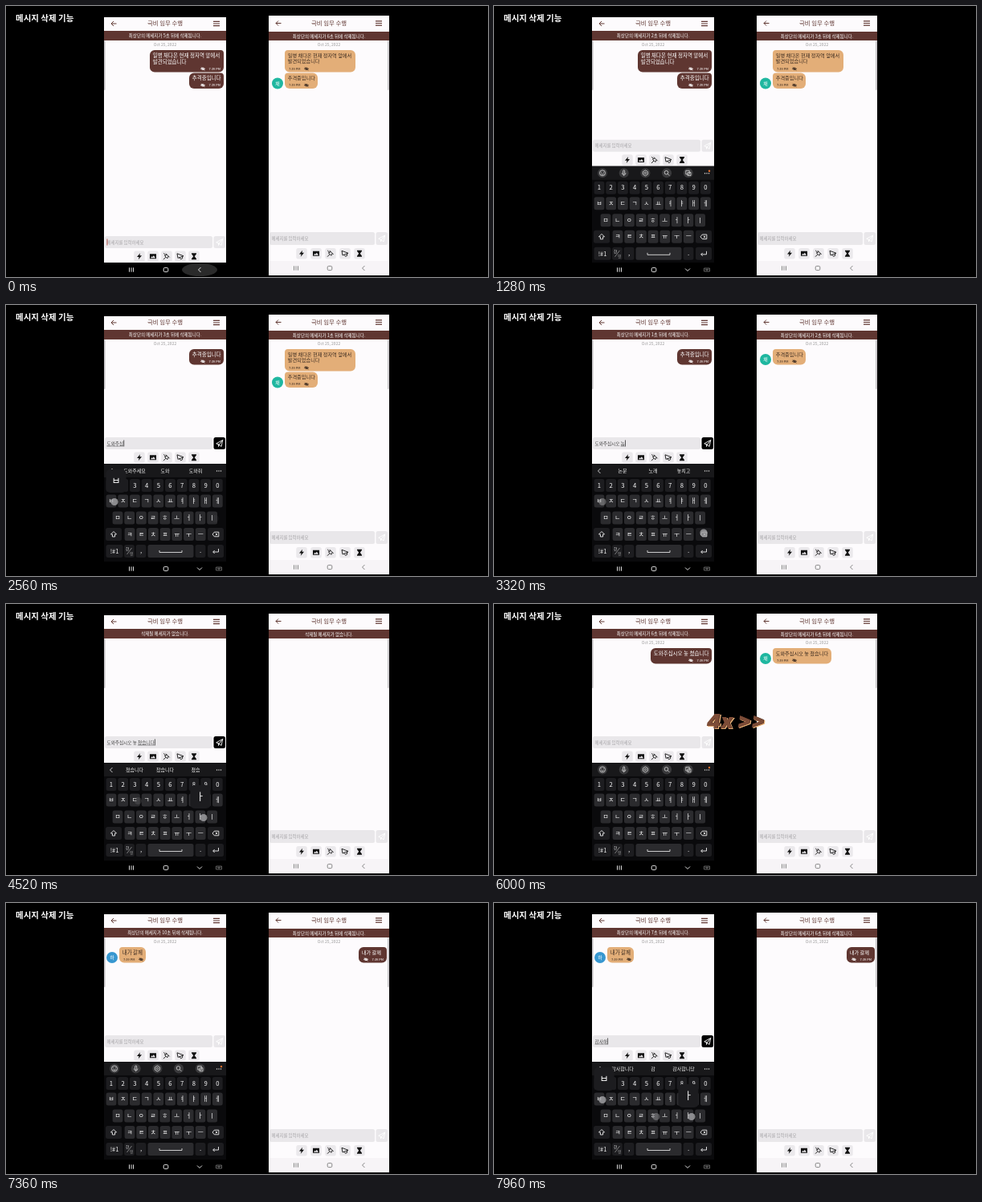
An HTML page with a canvas for the animation above (8000 ms loop, 600x338 px).

```html
<!DOCTYPE html>
<html lang="ko">
<head>
<meta charset="utf-8">
<title>메시지 삭제 기능</title>
<style>
html, body { margin: 0; width: 100%; height: 100%; overflow: hidden; background: #000; }
canvas { display: block; width: 600px; height: 338px; }
</style>
</head>
<body>
<canvas></canvas>
<script>
const LOOP = 8000;
const canvas = document.querySelector('canvas');
const g = canvas.getContext('2d');
const dpr = window.devicePixelRatio || 1;
canvas.width = 600 * dpr;
canvas.height = 338 * dpr;

const FONT = '"Noto Sans CJK KR", "Noto Sans", sans-serif';
const BROWN = '#5f3631', TAN = '#e3ae78';

function box(x, y, w, h, r, color) {
  g.fillStyle = color;
  g.beginPath();
  g.roundRect(x, y, w, h, r);
  g.fill();
}
const centered = (x, y, w, h, r, color) => box(x - w / 2, y - h / 2, w, h, r, color);

function disc(x, y, r, color, ry = r) {
  g.fillStyle = color;
  g.beginPath();
  g.ellipse(x, y, r, ry, 0, 0, 7);
  g.fill();
}
function text(s, x, y, size, color, align = 'center', weight = 400) {
  g.font = `${weight} ${size}px ${FONT}`;
  g.textAlign = align;
  g.textBaseline = 'middle';
  g.fillStyle = color;
  g.fillText(s, x, y);
}
// Draws an icon around (x, y): stroked when a line width is given, else filled.
function icon(d, x, y, color, width) {
  g.save();
  g.translate(x, y);
  g.fillStyle = g.strokeStyle = color;
  g.lineWidth = width;
  if (width) g.stroke(new Path2D(d)); else g.fill(new Path2D(d));
  g.restore();
}
const clamp = v => Math.max(0, Math.min(1, v));
const ease = v => 1 - (1 - clamp(v)) ** 3;

const ICON = {
  back: 'M3.5 0H-3M0-3L-3 0L0 3',
  menu: 'M-4-2.6H4M-4 0H4M-4 2.6H4',
  plane: 'M-4 .3L4-4L2.4 4L-.4 1.8ZM4-4L-.4 1.8L-1.2 4V1.1',
  eye: 'M-2.6 0Q0-2.8 2.6 0Q0 2.8-2.6 0M-2.2-1.8L2.4 2M.8 0A.8.8 0 1 1-.8 0A.8.8 0 1 1 .8 0',
  recent: 'M-2.5-2.7V2.7M0-2.7V2.7M2.5-2.7V2.7',
  home: 'M-1.3-2.6H1.3Q2.8-2.6 2.8-1.1V1.1Q2.8 2.6 1.3 2.6H-1.3Q-2.8 2.6-2.8 1.1V-1.1Q-2.8-2.6-1.3-2.6Z',
  left: 'M1.5-3L-1.5 0L1.5 3',
  down: 'M-3-1.5L0 1.5L3-1.5',
  board: 'M-3.5-2H3.5V2H-3.5ZM-2.2-.6H2.4M-1.5 .8H1.5',
  shift: 'M0-3.5L3.5 0H1.6V3H-1.6V0H-3.5Z',
  erase: 'M-4 0L-1.7-2.8H3.8V2.8H-1.7ZM-.3-1.2L2.1 1.2M2.1-1.2L-.3 1.2',
  enter: 'M3.5-3V1H-3.3M-1.3-1L-3.3 1L-1.3 3',
  space: 'M-5-1.2V1.2H5V-1.2'
};
const TOOLS = [
  ['M1-4L-3 .8H-.4L-1.2 4L3-1H.4Z'],
  ['M-4-3H4V3H-4ZM-3 2H3L.8-1L-.8 1L-1.6 0Z'],
  ['M-1.2-3.6L3.6 1.2M.2-2.2L-2.6-.8L.8 2.6L2.2-.2M-1 1L-4 4M-3.8-3.8L-1-1', .9],
  ['M-4-3.4L4-.4L-3 2.2ZM-1 1.6L.6 3.6L2.6 2.6V.2', .9],
  ['M-3-4H3V-3L.8 0L3 3V4H-3V3L-.8 0L-3-3Z']
];
const BAR = [
  'M3.5 0A3.5 3.5 0 1 1-3.5 0A3.5 3.5 0 1 1 3.5 0M-1.4-1.3V-.5M1.4-1.3V-.5M-1.7 1Q0 2.7 1.7 1',
  'M-1-2.5A1 1 0 0 1 1-2.5V0A1 1 0 0 1-1 0ZM-2.3 0A2.3 2.3 0 0 0 2.3 0M0 2.3V3.6',
  'M0-3.5L3-1.7V1.7L0 3.5L-3 1.7V-1.7ZM1.2 0A1.2 1.2 0 1 1-1.2 0A1.2 1.2 0 1 1 1.2 0',
  'M1.7-.6A2.3 2.3 0 1 1-2.9-.6A2.3 2.3 0 1 1 1.7-.6M1.1 1.1L3.3 3.3',
  'M-3-3H1.5V1.5H-3ZM-.8-.8H3.2V3.2H-.8Z'
];

const phones = {
  L: { x: 122, y: 14, w: 152, titleY: 22, bannerY: 31, fieldY: 287, fieldH: 15, fieldW: 134, gap: 17, toolX: 44,
       bottom: 320, lift: 122, size: 6.5, bar: '#000', ink: '#ddd', nav: [156, 199, 241, 265], navY: 329 },
  R: { x: 327, y: 12, w: 150, titleY: 21.5, bannerY: 32, fieldY: 282, fieldH: 16, fieldW: 131, gap: 18, toolX: 41,
       bottom: 318, lift: 121.5, size: 6.2, bar: '#f7f4f7', ink: '#888', nav: [361, 403, 445, 468], navY: 327 }
};

// Each message counts down on both phones; the receiver runs slightly late.
const LAG = .65;
const messages = [
  { by: 'L', from: -1e4, end: 2250, rate: 500, lines: ['일병 채다온 현재 정자역 앞에서', '발견되었습니다'], w: 92, wOther: 88 },
  { by: 'L', from: -1e4, end: 3700, rate: 500, lines: ['추격중입니다'], w: 43, wOther: 41, face: '채' },
  { by: 'L', from: 5000, end: 6975, rate: 184, lines: ['도와주십시오 놓 쳤습니다'], w: 76, wOther: 73, face: '채' },
  { by: 'R', from: 7160, end: 9000, rate: 184, lines: ['내가 갈께'], w: 35, wOther: 33, face: '하' }
];

const HELP = '도와주십시오 ';
const words = (prefix, list) => list.split('/').map(s => prefix + s);
const typing = [
  { side: 'L', until: 5000,
    keys: 'ㄷㅗㅇㅗㅏㅈㅜㅅㅣㅂㅅㅣㅇㅗ ㄴㅗㅂ⌫ㅎ ㅊㅕㅆㅅㅡㅂㄴㅣㄷㅏ',
    at: i => i < 19 ? 1960 + (i - 3) * 89.3 : 3300 + (i - 18) * 98,
    states: [
      ...words('', 'ㄷ/도/동/도오/도와/도왖/도와주/도와줏/도와주시/도와주십/도와주싮/도와주십시/도와주십싱/도와주십시오'),
      ...words(HELP, '/ㄴ/노/놉/노/놓'),
      ...words(HELP + '놓 ', '/ㅊ/쳐/쳤/쳤ㅅ/쳤스/쳤습/쳤습ㄴ/쳤습니/쳤습닏/쳤습니다')] },
  { side: 'R', until: 7160, keys: 'ㄴㅏㅣㄱㅏ ㄱㅏㄴㄱㅓ', at: i => 6700 + i * 40,
    states: words('', 'ㄴ/나/내/낵/내가/내가 /내가 ㄱ/내가 가/내가 갈/내가 갈ㄲ/내가 갈께') },
  { side: 'L', until: 9000, keys: 'ㄱㅏㅁㅅㅏㅎㅏㅂ', at: i => 7945 - (7 - i) * 50,
    states: words('', 'ㄱ/가/감/감ㅅ/감사/감샇/감사하/감사합') }
];
const hints = [
  [2100, 3000, '도와주세요/도와/도와줘'],
  [3000, 3600, '논문/노래/놓치고'],
  [3600, 5000, '쳤습니다/찼습니다/쳤습'],
  [7700, 8000, '감사합니다/감/감사합니당']
];
const taps = [[1060, 190, 294], [5000, 265, 173], [6420, 395, 289], [7160, 468, 168]];

const darkKeys = { ' ': [205, 307, 57], '⌫': [261, 286, 20] };
[['1234567890', 131, 225], ['ㅂㅈㄷㄱㅅㅛㅕㅑㅐㅔ', 131, 244.5], ['ㅁㄴㅇㄹㅎㅗㅓㅏㅣ', 139, 265.5], ['ㅋㅌㅊㅍㅠㅜㅡ', 154, 286]]
  .forEach(([row, x, y]) => [...row].forEach((c, i) => darkKeys[c] = [x + i * 14.7, y, 12.8]));
const lightKeys = { ' ': [457, 253, 32] };
const lightRows = ['ㄱㅋ', 'ㅣㅡ', 'ㅏㅑ', 'ㄷㅌ', 'ㄴㄹ', 'ㅓㅕ', 'ㅁㅅ', 'ㅂㅍ', 'ㅗㅛ', 'ㅈㅊ', 'ㅇㅎ', 'ㅜㅠ'];
lightRows.forEach((s, i) => lightKeys[s[0]] = [348 + i % 3 * 36.5, 228 + (i / 3 | 0) * 24.7, 34]);

function darkBoard(t) {
  box(122, 198, 152, 140, 0, '#0a0a0c');
  box(122, 198, 152, 17, 0, '#18181a');
  const hint = hints.find(h => t >= h[0] && t < h[1]);
  if (hint) {
    icon(ICON.left, 131, 207, '#ddd', .9);
    hint[2].split('/').forEach((s, i) => text(s, 160 + i * 38, 206.5, 6, '#f2f2f2'));
  } else {
    BAR.forEach((d, i) => {
      disc(135 + i * 26.7, 206.5, 6, '#39393b');
      icon(d, 135 + i * 26.7, 206.5, '#ddd', .8);
    });
    disc(268, 204, 1.2, '#f0702c');
  }
  [-2.5, 0, 2.5].forEach(d => disc(265 + d, 207, .75, '#ddd'));

  for (const [c, [x, y, w]] of Object.entries(darkKeys)) {
    centered(x, y, w, 16, 2.5, y < 230 || c === '⌫' ? '#1d1d20' : '#2b2b2e');
    if (c === ' ') icon('M-14-1V1.5H14V-1', x, y, '#ddd', .9);
    else if (c === '⌫') icon(ICON.erase, x, y, '#eee', .9);
    else text(c, x, y - .3, 7.7, '#fff');
  }
  [[134, 286, 20], [135, 307, 21], [153.5, 307, 12.8], [168, 307, 12.8], [242, 307, 12.8], [261, 307, 20]]
    .forEach(k => centered(k[0], k[1], k[2], 16, 2.5, '#1d1d20'));
  icon(ICON.shift, 134, 286, '#eee', .9);
  icon(ICON.enter, 261, 307, '#eee', .9);
  icon('M3-4L-3 4', 153.5, 307, '#bbb', .6);
  text('!#1', 135, 307, 7.5, '#eee');
  text('한', 151, 304.5, 4.5, '#eee');
  text('영', 156, 310, 4.5, '#aaa');
  text(',', 168, 306, 8, '#eee');
  text('.', 242, 306, 8, '#eee');
}

function lightBoard() {
  box(327, 195, 150, 125, 0, '#e5e4ea');
  BAR.forEach((d, i) => icon(d, 340 + i * 26.3, 204, '#555', .8));
  [-2.5, 0, 2.5].forEach(d => disc(467 + d, 204, .75, '#555'));
  disc(470, 201.5, 1.2, '#f0702c');
  lightRows.forEach((s, i) => {
    const [x, y] = lightKeys[s[0]];
    centered(x, y, 34, 22, 2.5, '#fff');
    text(s, x, y, 9.5, '#222');
    const digit = i < 9 ? i + 1 : i === 10 ? 0 : '';
    text(digit, x + 13.5, y - 7, 4.5, '#888');
  });
  [[457, 228, 33], [457, 253, 33], [448, 277.5, 15], [465.5, 277.5, 15], [448, 302, 15], [465.5, 302, 15]]
    .forEach(k => centered(k[0], k[1], k[2], 22, 2.5, '#c6c5cd'));
  icon(ICON.erase, 457, 228, '#333', .9);
  icon(ICON.space, 457, 253, '#333', .9);
  icon(ICON.enter, 465.5, 277.5, '#333', .9);
  icon('M3-4L-3 4', 465.5, 302, '#777', .6);
  text('?', 448, 277.5, 9.5, '#222');
  text('!#1', 448, 302, 8, '#222');
  text('한', 463, 299, 4.5, '#333');
  text('가', 468, 305.5, 4.5, '#777');
}

function bubble(p, m, side, y) {
  const mine = m.by === side;
  const w = mine ? m.w : m.wOther;
  const x = mine ? p.x + p.w - 3 - w : p.x + (side === 'L' ? 19 : 20);
  const h = m.lines.length > 1 ? 27.5 : 19.5;
  const ink = mine ? '#fff' : '#3a2a20';
  box(x, y, w, h, mine ? [6, 4, 6, 6] : [4, 6, 6, 6], mine ? BROWN : TAN);
  m.lines.forEach((s, i) => text(s, x + 3.7, y + 6.3 + i * 7.8, p.size, ink, 'left'));
  const metaY = y + h - 4.2;
  text('7:39 PM', mine ? x + w - 4 : x + 5, metaY, 4, ink, mine ? 'right' : 'left');
  icon(ICON.eye, mine ? x + w - 26 : x + 27, metaY, ink, .8);
  if (!mine && m.face) {
    const fx = p.x + (side === 'L' ? 10 : 11);
    disc(fx, y + 13, 7, side === 'L' ? '#3797d0' : '#1fb7a0');
    text(m.face, fx, y + 13, 6, '#fff');
  }
}

function phone(side, t, open) {
  const p = phones[side], mid = p.x + p.w / 2;
  box(p.x, p.y, p.w, p.bottom - p.y, 0, '#fdfbfd');
  icon(ICON.back, p.x + 12, p.titleY, BROWN, 1);
  icon(ICON.menu, p.x + (side === 'L' ? 140 : 137), p.titleY, BROWN, 1.1);
  text('극비 임무 수행', mid, p.titleY - .5, 7.4, BROWN);
  box(p.x, p.bannerY, p.w, 43 - p.bannerY, 0, BROWN);

  const live = messages
    .map(m => ({ ...m, late: m.by === side ? 0 : LAG }))
    .filter(m => t >= m.from + m.late * 60 && t < m.end + m.late * m.rate);
  let notice = '삭제될 메세지가 없습니다.';
  if (live.length) {
    const m = live[0];
    const left = Math.min(10, Math.ceil((m.end - t) / m.rate + m.late));
    notice = `최상단의 메세지가 ${left}초 뒤에 삭제됩니다.`;
    text('Oct 25, 2022', mid, 48.3, 5, '#999');
  }
  text(notice, mid, p.bannerY + 6, 5.5, '#fff', 'center', 500);
  box(side === 'L' ? p.x : p.x + p.w - 2, 43, 1.6, 62, .8, '#c4c2c5');
  let y = 55;
  for (const m of live) {
    bubble(p, m, side, y);
    y += 28.5;
  }

  g.save();
  g.beginPath();
  g.rect(p.x, p.y, p.w, p.bottom - p.y);
  g.clip();
  const fy = p.fieldY - p.lift * open, cy = fy + p.fieldH / 2;
  box(p.x, fy - 2, p.w, 40, 0, '#fdfbfd');
  box(p.x + 1, fy, p.fieldW, p.fieldH, 2.5, '#e9e7ea');

  const run = typing.find(r => r.side === side && t >= r.at(0) + 30 && t < r.until);
  const tx = p.x + 3.5;
  if (run) {
    const s = run.states.filter((_, i) => t >= run.at(i) + 30).pop();
    text(s, tx, cy, 5.6, '#444', 'left');
    const end = tx + g.measureText(s).width;
    const start = tx + g.measureText(s.slice(0, s.lastIndexOf(' ') + 1)).width;
    box(start, cy + 3.2, end - start, .6, 0, '#555');
    box(end + .3, cy - 4, .8, 8, 0, '#333');
  } else {
    text('메세지를 입력하세요', tx, cy, 5.4, '#a5a3a6', 'left');
    if ((side === 'L' || open > 0) && t % 440 < 220) box(tx, cy - 4, .9, 8, 0, '#b0483c');
  }
  const sx = p.x + p.fieldW + 2.5;
  box(sx, fy, 14.5, p.fieldH, 2.5, run ? '#000' : '#e9e7ea');
  icon(ICON.plane, sx + 7.2, cy, '#fff', .9);
  const ty = cy + (side === 'L' ? 17.7 : 18.7);
  TOOLS.forEach(([d, width], i) => {
    const x = p.x + p.toolX + i * p.gap;
    centered(x, ty, 13.5, 13.5, 2.5, '#ebe9ec');
    icon(d, x, ty, '#111', width);
  });
  if (open > 0) {
    g.translate(0, p.lift * (1 - open));
    if (side === 'L') darkBoard(t); else lightBoard();
  }
  g.restore();

  box(p.x, p.bottom, p.w, 18, 0, side === 'R' && open > .5 ? '#e5e4ea' : p.bar);
  const [a, b, c, d] = p.nav;
  if (side === 'L' && t < 400) disc(c, p.navY, 22, `rgba(60,60,60,${.7 * (1 - ease((t - 60) / 320))})`, 8);
  icon(ICON.recent, a, p.navY, p.ink, 1);
  icon(ICON.home, b, p.navY, p.ink, 1);
  icon(open > .5 ? ICON.down : ICON.left, c, p.navY, p.ink, 1);
  if (open > .5) icon(ICON.board, d, p.navY, '#888', .7);
}

function touch(x, y, age) {
  if (age < 0 || age > 160) return;
  disc(x, y, 4.6, `rgba(165,165,168,${.8 * clamp((160 - age) / 80)})`);
}

function presses(t) {
  for (const run of typing) {
    const dark = run.side === 'L';
    [...run.keys].forEach((c, i) => {
      const age = t - run.at(i);
      if (age < 0 || age > 160) return;
      const key = c === 'ㅆ' ? 'ㅅ' : c;
      const [x, y] = (dark ? darkKeys : lightKeys)[key];
      if (dark && age < 75 && !' ⌫'.includes(c)) {
        const px = Math.max(137, x);
        centered(px, y - 25, 25, 29, 5, '#1c1c1f');
        text(c, px, y - 25, 12, '#fff');
      }
      touch(x + (c === '⌫' ? 0 : 4), y + (c === '⌫' ? -2 : 1), age);
    });
  }
  taps.forEach(([at, x, y]) => touch(x, y, t - at));
}

function speedLabel(t) {
  const layers = ['#7d4c37', '#3a2018', '#e0a56c', '#f0c08a'];
  g.save();
  g.globalAlpha = clamp((t - 5720) / 100) * clamp((6460 - t) / 100);
  g.font = 'italic 900 25px Inter, "Open Sans", sans-serif';
  g.textAlign = 'center';
  g.textBaseline = 'middle';
  for (let i = 3; i >= 0; i--) {
    g.fillStyle = layers[i];
    g.fillText('4x', 281 + i * .6, 147 + i * .6);
    g.fillText('>>', 320 + i * .6, 146 + i * .6);
  }
  g.restore();
}

function draw() {
  const t = performance.now() % LOOP;
  g.setTransform(dpr, 0, 0, dpr, 0, 0);
  box(0, 0, 600, 338, 0, '#000');
  text('메시지 삭제 기능', 12, 15.2, 10.5, '#fff', 'left', 700);
  phone('L', t, ease((t - 1100) / 240));
  phone('R', t, ease((t - 6440) / 160) * (1 - ease((t - 7220) / 130)));
  presses(t);
  if (t > 5720 && t < 6460) speedLabel(t);
  requestAnimationFrame(draw);
}
draw();
</script>
</body>
</html>
```
